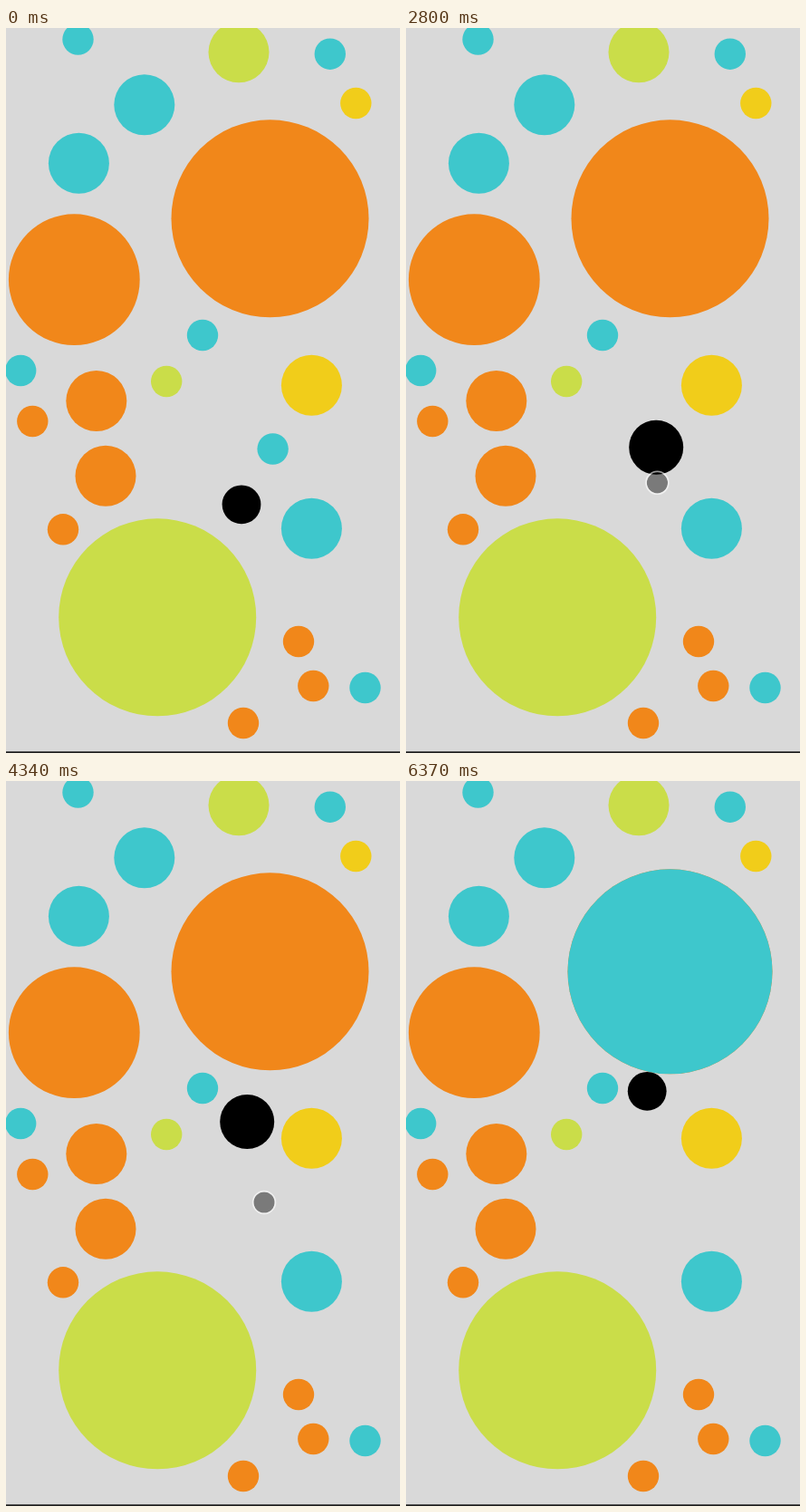
Recreate the animation shown at these times as an HTML page with a canvas. Size 435 px wide and 800 px high, loop 6.93 s.

```html
<!DOCTYPE html>
<html lang="en">
<head>
<meta charset="utf-8">
<title>Dots</title>
<style>
html, body { margin: 0; width: 100%; height: 100%; overflow: hidden; background: #d9d9d9; }
canvas { display: block; width: 435px; height: 800px; }
</style>
</head>
<body>
<canvas id="stage" width="435" height="800"></canvas>
<script>
const W = 435, H = 800, LOOP = 6930, STEP = 70;
const TEAL = '#3ec7cc', ORANGE = '#f1871a', LIME = '#cadd49', YELLOW = '#f1cd1a';
const SMALL = 17.2, MEDIUM = 33.5, LARGE = 72.4, HUGE = 109;
const ctx = document.getElementById('stage').getContext('2d');

const smooth = p => p * p * (3 - 2 * p);
const easeOut = p => 1 - (1 - p) ** 3;
const easeIn = p => p * p;
const mix = (a, b, p) => a + (b - a) * p;

// Eased progress from 0 to 1 between two times
function ramp(t, from, to, ease = smooth) {
  return ease(Math.min(1, Math.max(0, (t - from) / (to - from))));
}

function disc(x, y, r, color) {
  ctx.beginPath();
  ctx.arc(x, y, r, 0, Math.PI * 2);
  ctx.fillStyle = color;
  ctx.fill();
}

function dots(color, r, ...spots) {
  for (const [x, y] of spots) disc(x, y, r, color);
}

function drawField() {
  dots(TEAL, SMALL, [79.5, 12.5], [357.8, 28.7], [217, 339], [16.2, 378], [396.5, 728]);
  dots(TEAL, MEDIUM, [152.8, 84.8], [80.4, 149.2], [337.4, 552.3]);
  dots(ORANGE, SMALL, [29.3, 434], [63, 553.3], [323, 677], [339.3, 726], [262, 767]);
  dots(ORANGE, MEDIUM, [99.8, 411.5], [110, 494.2]);
  dots(ORANGE, LARGE, [75.3, 277.7]);
  dots(LIME, SMALL, [177.2, 390]);
  dots(LIME, MEDIUM, [257, 26.8]);
  dots(LIME, HUGE, [167.2, 650.3]);
  dots(YELLOW, SMALL, [386.3, 83]);
  dots(YELLOW, MEDIUM, [337.4, 394.3]);
}

// The ball eats the teal dot, climbs, then feeds the big disc
function drawPlay(t) {
  const eat = ramp(t, 2240, 2800);
  const climb = ramp(t, 3430, 3920);
  const feed = ramp(t, 4340, 4760);

  const r = HUGE + 4 * feed;
  disc(291.5, 210.3, r, ORANGE);
  ctx.globalAlpha = feed;
  disc(291.5, 210.3, r, TEAL);
  ctx.globalAlpha = 1;

  disc(294.6, 464.5, SMALL * (1 - eat), TEAL);
  disc(
    260 + 16.2 * eat - 10 * climb,
    525.8 - 63.1 * eat - 86.7 * climb - 33.7 * feed,
    21.4 + 8.6 * (eat - feed),
    '#000'
  );
}

function drawPointer(t) {
  if (t < 1120 || t >= 5530) return;
  const arrive = ramp(t, 1120, 1610, easeOut);
  const follow = ramp(t, 2660, 3220);
  const drift = ramp(t, 4200, 4340);
  const leave = ramp(t, 5180, 5530, easeIn);
  const x = mix(398, 276.5, arrive) + 6 * follow + 2.5 * drift + 360 * leave;
  const y = mix(472, 508, arrive) - 39.5 * follow - 3.5 * drift + 310 * leave;

  disc(x, y, 11.6, 'rgba(0,0,0,.44)');
  ctx.beginPath();
  ctx.arc(x, y, 12.4, 0, Math.PI * 2);
  ctx.strokeStyle = 'rgba(255,255,255,.6)';
  ctx.lineWidth = 1.7;
  ctx.stroke();
}

function draw(t) {
  ctx.fillStyle = '#d9d9d9';
  ctx.fillRect(0, 0, W, H);
  drawField();
  drawPlay(t);
  ctx.fillStyle = '#1c1c1c';
  ctx.fillRect(0, 798.3, W, 1.7);
  drawPointer(t);
}

const start = performance.now();
function tick() {
  const t = (performance.now() - start) % LOOP;
  draw(Math.floor(t / STEP) * STEP);
  requestAnimationFrame(tick);
}
tick();
</script>
</body>
</html>
```
